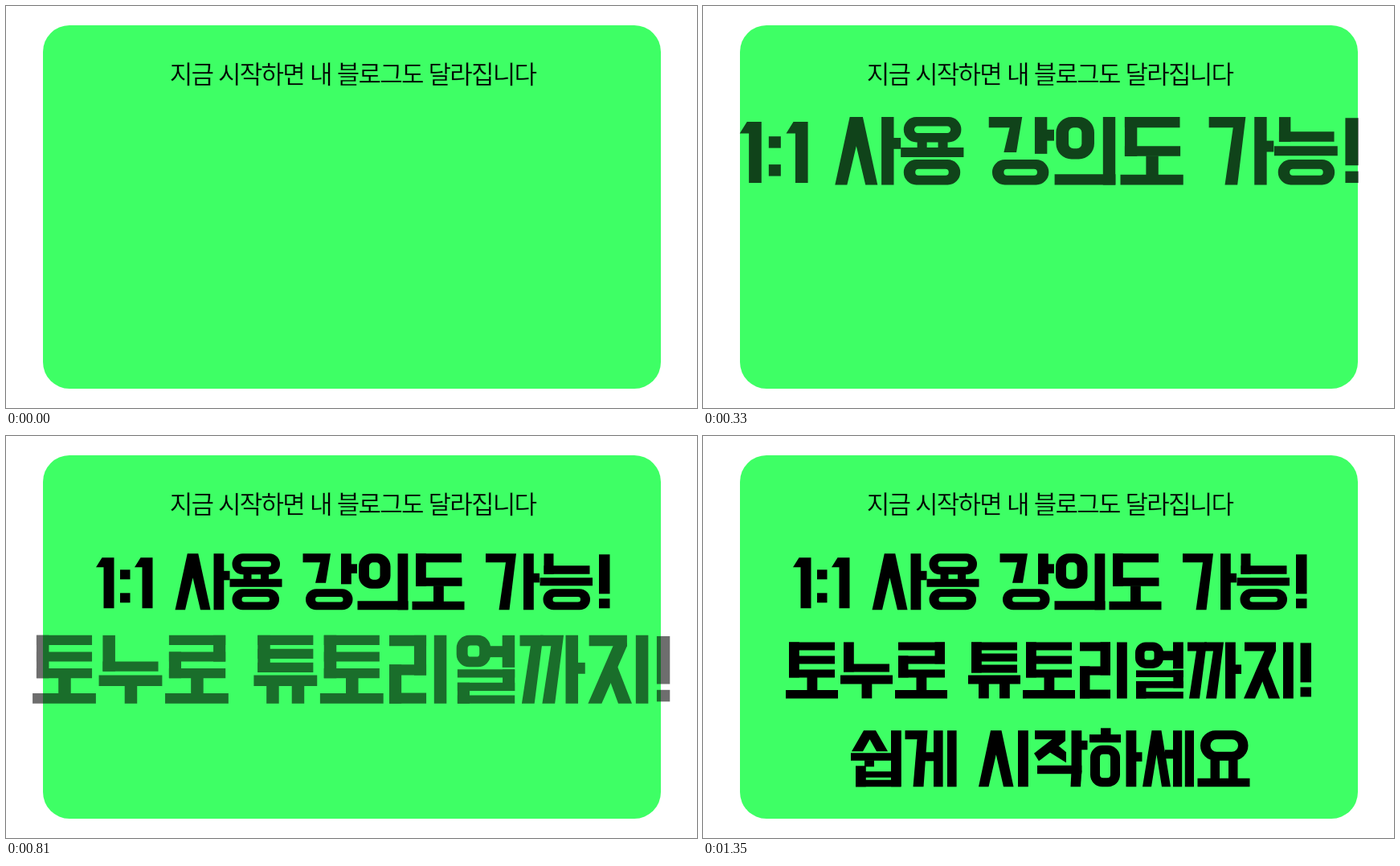
These frames come from a looping animation (860 by 500 pixels, 1.85 s). An HTML page:

```html
<!DOCTYPE html>
<html lang="ko">
<head>
<meta charset="utf-8">
<style>
  html, body { margin: 0; width: 100%; height: 100%; overflow: hidden; background: #fff; }
  svg { display: block; width: 860px; height: 500px; }
  .title {
    font: 300 31px "Noto Sans CJK KR", "Noto Sans CJK", sans-serif;
    letter-spacing: -1.77px;
    stroke: #3eff65; stroke-width: .3px;
  }
  .line path { fill-rule: evenodd; }
</style>
</head>
<body>
<svg id="stage" viewBox="0 0 860 500">
  <rect x="46" y="24" width="769" height="452" rx="33" fill="#3eff65"/>
  <text class="title" x="203.7" y="96.4">지금 시작하면 내 블로그도 달라집니다</text>
</svg>
<script>
const LOOP = 1850, STEP = 30;
const SYLLABLE = 68, SPACE = 23;

// Path pieces of the display lettering; a syllable is about 65 x 70.
const poly = (...p) => 'M' + p.join(' ') + 'Z';
const bar = (x1, y1, x2, y2) => poly(x1, y1, x2, y1, x2, y2, x1, y2);
const stem = (x, top = 0, bottom = 70, width = 12.8) => bar(x, top, x + width, bottom);

function roundBox(x1, y1, x2, y2, r) {
  r = Math.min(r, (x2 - x1) / 2, (y2 - y1) / 2);
  const arc = (x, y) => `A${r} ${r} 0 0 1 ${x} ${y}`;
  return `M${x1 + r} ${y1}H${x2 - r}${arc(x2, y1 + r)}V${y2 - r}${arc(x2 - r, y2)}` +
         `H${x1 + r}${arc(x1, y2 - r)}V${y1 + r}${arc(x1 + r, y1)}Z`;
}
const ring = (x1, y1, x2, y2, tx, ty, r = 13) =>
  roundBox(x1, y1, x2, y2, r) +
  roundBox(x1 + tx, y1 + ty, x2 - tx, y2 - ty, Math.max(3, r - ty));

const giyeok = (x, w, foot, h = 70) =>
  poly(x, 0, x + w, 0, foot + 13, h, foot, h, x + w - 13, 11, x, 11);
const siot = (x, w, t = 13.5) => {
  const mid = x + w / 2;
  return poly(x, 70, mid - t / 2, 0, mid + t / 2, 0, x + w, 70,
              x + w - t + 1, 70, mid, 30, x + t - 1, 70);
};
const tieut = (mid, low) => [
  stem(4, 0, low + 10), bar(4, 0, 61, 10), bar(4, mid, 61, mid + 10), bar(4, low, 61, low + 10)
];
const rieul = (x1, x2, y, mid, low, t) => [
  bar(x1, y, x2, y + t), bar(x2 - 12.5, y, x2, mid + t), bar(x1, mid, x2, mid + t),
  bar(x1, mid, x1 + 12.5, low + t), bar(x1, low, x2, low + t)
];
const oVowel = top => [stem(26.5, top, 62), bar(0, 59.5, 65, 70)];
const aVowel = (x, tick, bottom = 70) => [stem(x, 0, bottom), bar(x + 12, tick, x + 20, tick + 11.5)];
const lowRing = x => ring(x, 44, x + 58.5, 70, 12, 9.7);

const glyphs = {
  '1': [poly(0, 17, 7.5, 5, 22.5, 5, 22.5, 68, 9.5, 68, 9.5, 17)],
  ':': [bar(2.5, 20, 15, 32), bar(2.5, 49, 15, 61)],
  '!': [bar(5.5, 1, 19, 50), bar(5.5, 56, 19, 68)],
  '사': [siot(0, 44), ...aVowel(48, 21.5)],
  '용': [ring(3, 0, 62.5, 26, 11, 9.5), bar(17, 24, 27, 33), bar(38.5, 24, 48.5, 33),
        bar(0, 31.5, 65, 41.5), lowRing(3)],
  '강': [giyeok(0, 34.5, 15.5, 36.5), ...aVowel(47.5, 13, 38), lowRing(3.5)],
  '의': [ring(1.5, 0, 41, 43.5, 13, 11, 16), bar(0, 59, 63, 70), stem(50)],
  '도': [stem(4.5, 0, 40.5), bar(4.5, 0, 61.5, 11), bar(4.5, 30, 62, 40.5), ...oVowel(40)],
  '가': [giyeok(0.5, 38, 17), ...aVowel(47.5, 24.5)],
  '능': [bar(5, 0, 17, 25.5), bar(5, 15, 62, 25.5), bar(0, 30, 65.5, 40), lowRing(4)],
  '토': [...tieut(17, 34), ...oVowel(43)],
  '누': [stem(4, 0, 37), bar(4, 27, 61, 37), bar(0, 41, 65, 52), stem(26.5, 51)],
  '로': [...rieul(4, 62, 0, 17, 34, 10), ...oVowel(43)],
  '튜': [...tieut(14, 28), bar(0, 41, 65, 52), stem(13, 51), stem(39, 51)],
  '리': [...rieul(3, 41, 0, 30, 59, 11), stem(49)],
  '얼': [ring(4, 0, 39, 32.5, 11.5, 10.5), bar(37, 11, 53, 22.5), stem(51, 0, 33),
        ...rieul(5, 63.8, 35, 48.5, 61.5, 8.5)],
  '까': [giyeok(1, 24, 3), giyeok(22, 24, 24), ...aVowel(48, 28)],
  '지': [bar(4, 0, 43, 11), poly(30, 8, 43, 8, 43, 11, 17, 70, 3, 70),
        poly(23, 40, 32, 29, 48, 70, 34, 70), stem(52)],
  '쉽': [poly(2, 26, 17, 0, 32, 0, 47, 26, 33, 26, 24.5, 11, 16, 26), bar(1, 28, 53, 37.5),
        bar(18, 37, 30, 45), stem(51), stem(7, 44), bar(7, 51, 63, 58.5), bar(7, 61.5, 63, 70)],
  '게': [giyeok(0.5, 28, 10.5), bar(25, 27, 38, 38), stem(36, 0, 70, 11.6), stem(53, 0, 70, 11.6)],
  '시': [siot(1, 43.5), stem(50)],
  '작': [bar(3, 0, 41, 11), poly(27, 9, 41, 8, 41, 13, 8, 38, 2, 28.5),
        poly(18, 25, 30, 17, 42, 27, 42, 40), ...aVowel(48.5, 12.5, 52),
        bar(6, 43.5, 61.3, 54), poly(48.5, 50, 61.3, 50, 60, 70, 47.5, 70)],
  '하': [bar(17, -3, 29.5, 7), bar(3, 5, 42, 15), ring(4, 18.5, 41, 70, 12, 11, 15), ...aVowel(48.5, 27)],
  '세': [siot(1, 35, 12), bar(29, 24, 41, 35), stem(39, 0, 70, 11.2), stem(53.8, 0, 70, 11.2)],
  '요': [ring(5, 0, 64.5, 37.5, 12.5, 11, 19), stem(17.5, 36, 62, 11.5), stem(40, 36, 62, 11.5),
        bar(1.5, 59.5, 66.5, 70)]
};
const advances = { ' ': SPACE, '1': 27.5, ':': 20.5 };

const lines = [
  { text: '1:1 사용 강의도 가능!', x: 112, y: 146.3, cx: 437, cy: 186.5,
    start: 0, length: 450, grow: 0.765, fade: p => p },
  { text: '토누로 튜토리얼까지!', x: 103, y: 256.4, cx: 431.5, cy: 296.5,
    start: 510, length: 420, grow: 0.745, fade: p => 0.03 + 0.75 * p },
  { text: '쉽게 시작하세요', x: 183, y: 366.3, cx: 435.5, cy: 406.5,
    start: 930, length: 420, grow: 1.067, fade: p => 0.03 + 0.75 * p }
];

const stage = document.getElementById('stage');

function svgNode(tag, attrs, parent) {
  const node = document.createElementNS(stage.namespaceURI, tag);
  for (const key in attrs) node.setAttribute(key, attrs[key]);
  return parent.appendChild(node);
}

for (const line of lines) {
  line.node = svgNode('g', { class: 'line', role: 'img', 'aria-label': line.text }, stage);
  let x = line.x;
  for (const char of line.text) {
    const place = svgNode('g', { transform: `translate(${x} ${line.y})` }, line.node);
    for (const d of glyphs[char] || []) svgNode('path', { d }, place);
    x += advances[char] || SYLLABLE;
  }
}

function draw(now) {
  const t = Math.floor((now % LOOP) / STEP) * STEP;
  for (const { node, cx, cy, start, length, grow, fade } of lines) {
    const p = Math.min(1, Math.max(0, (t - start) / length));
    const scale = 1 + grow * (1 - p);
    node.setAttribute('opacity', p === 0 ? 0 : p === 1 ? 1 : fade(p));
    node.setAttribute('transform', `translate(${cx} ${cy}) scale(${scale}) translate(${-cx} ${-cy})`);
  }
}

let origin;
function tick(now) {
  origin ??= now;
  draw(Math.max(0, now - origin));
  requestAnimationFrame(tick);
}
draw(0);
requestAnimationFrame(tick);
</script>
</body>
</html>
```
